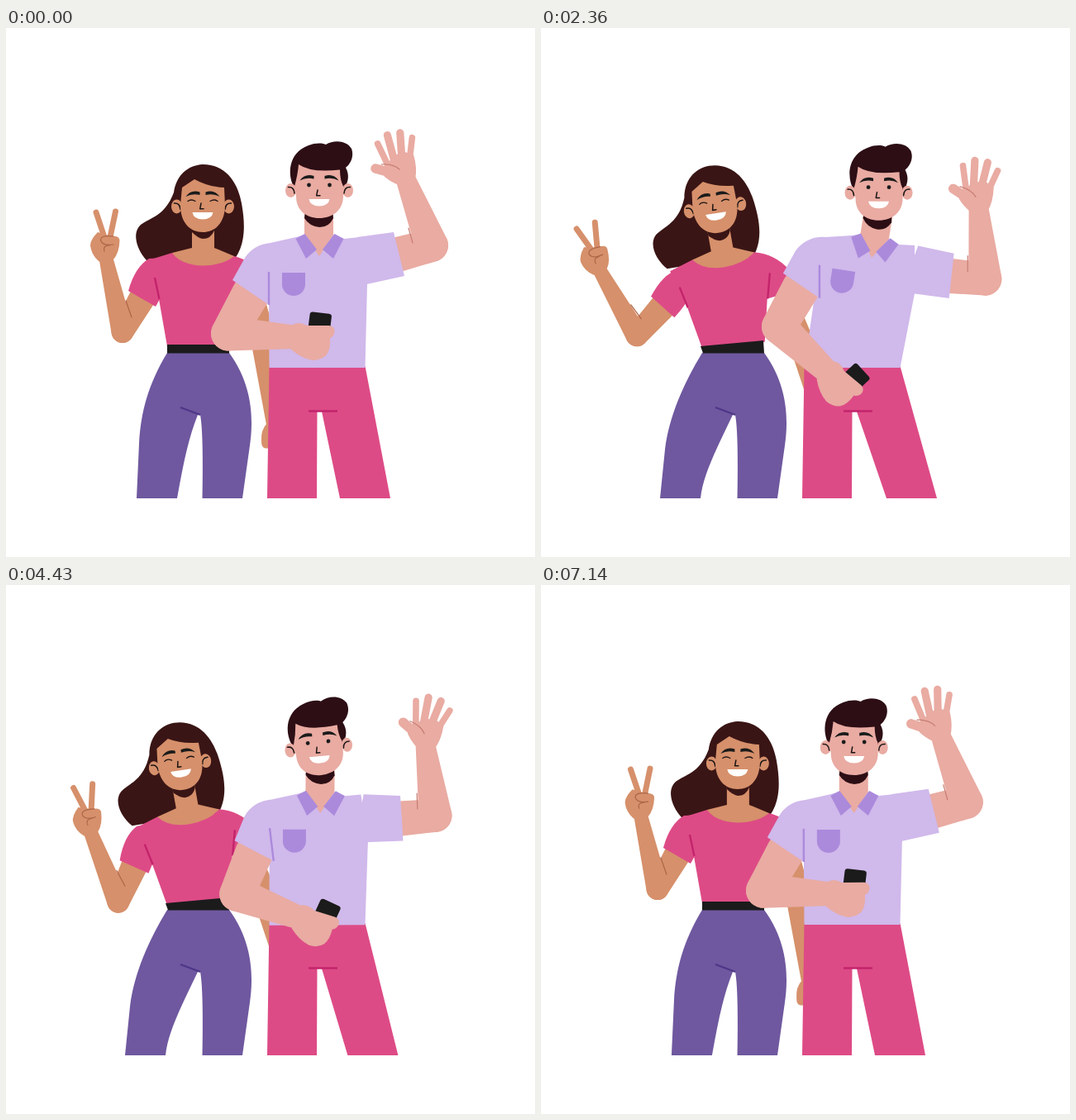
An HTML page for the animation above (7210 ms loop, 640x640 px).

```html
<!DOCTYPE html>
<html lang="en">
<head>
<meta charset="utf-8">
<title>Waving friends</title>
<style>
  html, body { margin: 0; width: 100%; height: 100%; overflow: hidden; background: #fff; }
  svg { display: block; width: 100vw; height: 100vh; }
  .line { fill: none; stroke-linecap: round; stroke-linejoin: round; }
  .ink { stroke: #1a1414; stroke-width: 1.5; }
  .tan { fill: #d6906b; }
  .tanStroke { stroke: #d6906b; }
  .tanCrease { stroke: #ad6647; stroke-width: 1.2; }
  .rose { fill: #e9aba2; }
  .roseStroke { stroke: #e9aba2; }
  .roseCrease { stroke: #c77d72; stroke-width: 1.2; }
  .brown { fill: #3a1515; }
  .dark { fill: #2d0e15; }
  .pink { fill: #dd4b86; }
  .lilac { fill: #d0b9eb; }
  .violet { fill: #ab8adc; }
  .purple { fill: #6f589f; }
  .black { fill: #1b1b1b; }
  .white { fill: #fff; }
  .fold { stroke-width: 2.4; stroke-linecap: butt; }
  .pinkFold { stroke: #c3246c; }
  .violetFold { stroke: #ab8adc; }
  .purpleFold { stroke: #4e3788; }
</style>
</head>
<body>
<svg id="stage" viewBox="0 0 640 640"></svg>
<script>
const LOOP = 7210, STEPS = 101;
const rad = deg => deg * Math.PI / 180;

const shape = (cls, d) => `<path class="${cls}" d="${d}"/>`;
const line = (cls, d, width) =>
  `<path class="line ${cls}" d="${d}"${width ? ` style="stroke-width:${width}"` : ''}/>`;
const oval = (cls, x, y, rx, ry = rx) =>
  `<ellipse class="${cls}" cx="${x}" cy="${y}" rx="${rx}" ry="${ry}"/>`;
const group = (id, ...parts) => `<g id="${id}">${parts.join('')}</g>`;
const shift = (x, y, ...parts) => `<g transform="translate(${x} ${y})">${parts.join('')}</g>`;
const mirrored = (...parts) => parts.join('') + `<g transform="scale(-1 1)">${parts.join('')}</g>`;
const polar = (x, y, r, a) => `${(x + r * Math.cos(a)).toFixed(2)} ${(y + r * Math.sin(a)).toFixed(2)}`;

// Tapered limb with round ends.
function limb(cls, x1, y1, r1, x2, y2, r2) {
  const a = Math.atan2(y2 - y1, x2 - x1);
  const b = Math.acos((r1 - r2) / Math.hypot(x2 - x1, y2 - y1));
  return shape(cls, `M${polar(x1, y1, r1, a + b)}A${r1} ${r1} 0 1 1 ${polar(x1, y1, r1, a - b)}` +
    `L${polar(x2, y2, r2, a - b)}A${r2} ${r2} 0 0 1 ${polar(x2, y2, r2, a + b)}Z`);
}

// Both faces share their features; the origin lies between the ears.
function face(skin, earX, mouthY, skull, eye) {
  return mirrored(
    oval(skin, -earX, 0, 6.5, 8.5),
    line('ink', `M${-earX - 3} -4Q${4 - earX} -4.500 ${4.5 - earX} 3.500`)) +
    shape(skin, skull) +
    mirrored(
      shift(34.5 - earX, 0, shape('black', 'M-23.500 -12Q-17 -21 -6.500 -17.500V-14Q-16 -16 -23.500 -12Z')),
      eye) +
    line('ink', `M-2 ${mouthY - 11}L-3.300 ${mouthY - 4.2}H1`) +
    shape('white', `M-12.500 ${mouthY}H12.500Q11 ${mouthY + 8.5} 0 ${mouthY + 8.5}Q-11 ${mouthY + 8.5} -12.500 ${mouthY}Z`);
}

// Four fingers fan out from the wrist, the second one longest.
function fingers(x, y) {
  return [0, 1, 2, 3].map(i => {
    const base = polar(x, y, 27, rad(-142 + 20.5 * i));
    const tip = polar(x, y, 59 - 2.2 * (i - 1.2) ** 2, rad(-128 + 15.4 * i));
    return line('roseStroke', `M${base}L${tip}`, i % 3 ? 9.2 : 7.6);
  }).join('');
}

const peaceArm = group('peaceArm',
  limb('tan', 165, 326, 16, 141, 367.5, 13.5),
  group('peaceFore',
    limb('tan', 141, 367.5, 13.5, 121.5, 281, 8.5),
    line('tanCrease', 'M145 330L152 350'),
    line('tanStroke', 'M109 223L119 253M132.500 222L126 253', 7),
    shape('tan', 'M111 247L127 252Q137 251 137.500 257Q137 272 130 280Q121 286 112 282Q103 274 102 263Q102 256 111 247Z'),
    line('tanCrease', 'M130 252Q114 250 114.500 257Q117 264 130 262M125 263Q117 263 119 270')),
  shape('pink', 'M181 337L148 318Q156 289 173 279L196 278L192 315L186 328Z'));

const woman = group('woman',
  group('restArm',
    shape('tan', 'M288 320L298 388L315 480H340V400L326 375L314 330Z'),
    shape('tan', 'M316 478Q308 486 309 500Q309 508 314 508.500H330V478Z')),
  group('womanLegs',
    '<path id="womanLeg" class="purple"/>',
    shape('purple', 'M195 393H270C300 434 299 477 295 505L286 569H237.500Q239 490 235 468L205 461Z'),
    line('fold purpleFold', 'M211 459L235 468')),
  group('womanTorso',
    group('womanHair',
      shape('brown', 'M238 165C268 165 281 190 285 212C290 240 289 262 277 279L170 281C158 268 152 248 163 238C175 229 192 228 203 199C206 178 220 166 238 165Z')),
    peaceArm,
    shape('pink', 'M276 276Q300 282 314 304L312 331L282 334L270 385H195L185 328L172 281L201 272Z'),
    line('fold pinkFold', 'M180 302L185.500 328M290.500 304L282.500 334'),
    shape('tan', 'M225 235V266L201 272Q212 287 238 287.500Q263 287 276 276L252 266V235Z'),
    shape('brown', 'M225 240H252V245Q248 255 238 255Q232 254 225 247Z'),
    group('womanHead', shift(238, 216, face('tan', 31.5, 7,
      'M-27 -2L-25 -23L-10 -33Q6 -24 26 -23L27 -2C27 20 15 31 0 31C-15 31 -27 20 -27 -2Z',
      line('ink', 'M-18 -6.500Q-14 -9.500 -9 -6.500', 1.3))))),
  '<path id="belt" class="black"/>');

const waveArm = group('waveArm',
  limb('rose', 474, 274, 21, 515, 263, 20),
  group('waveFore',
    limb('rose', 515, 263, 20, 484, 184, 12),
    line('roseCrease', 'M487 242L492 260'),
    group('waveHand',
      fingers(484, 184),
      line('roseStroke', 'M447 170L465 175', 11.5),
      shape('rose', 'M461 166L467 156L475 152L482 150L493 153Q498 170 495 183Q491 191 484 192Q470 190 458 180L452 168Z'),
      line('roseCrease', 'M454 165Q468 164 476 171'))),
  shape('lilac', 'M482 300L469 247L425 253V312.500Z'));

const phoneArm = group('phoneArm',
  limb('rose', 296, 322, 23, 269, 369.5, 21),
  group('phoneFore',
    limb('rose', 269, 369.5, 21, 352, 374, 14),
    '<rect class="black" x="368" y="343" width="26.500" height="22" rx="3.500" transform="rotate(7 368 343)"/>',
    shape('rose', 'M345 360Q354 354 364 360H391Q398 361 397.500 368Q396 374 392 375Q393 388 388 395Q382 402 371 402Q358 400 345 389Z')),
  shape('lilac', 'M318 335L274 305L289 278Q295 269 305 266L330 275V320Z'),
  line('fold violetFold', 'M318 295V335'));

const man = group('man',
  '<path id="manLegs" class="pink"/>',
  line('fold pinkFold', 'M366 463.500H401'),
  group('manTorso',
    waveArm,
    '<path id="shirt" class="lilac"/>',
    shape('rose', 'M361 205V250L379 276L396 250V205Z'),
    shape('dark', 'M362 222H395L396 230Q391 241 379.500 241Q367 240 361 230Z'),
    shift(379.5, 0, mirrored(shape('violet', 'M-29 255L-18 249L-3.500 268L-16.500 279Z'))),
    shape('violet', 'M334 296H362V310A14 14 0 0 1 334 310Z'),
    phoneArm,
    group('manHead',
      shape('dark', 'M349 194C340 178 341 151 366 142C374 138.500 384 139 387 141C397 135 412 136 418 146C422 157 415 166 411 169C416 178 414 187 409 194Z'),
      shift(379, 196.5, face('rose', 34.5, 10.5,
        'M-30 -5Q-26 -19 -25 -31.500Q-10 -21 25 -25Q25 -13 29 -5V7C29 24 16 33.500 0 33.500C-16 33.500 -28 24 -28 7Z',
        oval('black', -12.5, -6.5, 2.4))))));

document.getElementById('stage').innerHTML = woman + man;

const el = id => document.getElementById(id);
const draw = (id, d) => el(id).setAttribute('d', d);
const turn = (id, deg, x, y, lift = [0, 0]) =>
  el(id).setAttribute('transform', `translate(${lift}) rotate(${deg} ${x} ${y})`);

function poseWoman(ease) {
  const lean = ease(15, 32) - ease(78, 101);
  const arm = -14 * ease(0, 15) + 36 * ease(15, 33) - 18 * ease(46, 62) - 4 * ease(78, 101);
  const swing = -18.5 * ease(0, 15) - 10.5 * ease(15, 33) - 9.5 * ease(33, 46) +
    35.5 * ease(46, 62) - 21 * ease(62, 80) + 24 * ease(80, 101);

  turn('womanTorso', -10 * lean, 240, 378);
  for (const id of ['womanHair', 'womanHead']) turn(id, 1.7 * lean, 238, 245, [0, -1.5 * lean]);
  turn('restArm', -8 * lean, 300, 390, [4 * lean, 0]);
  turn('peaceArm', arm, 174, 302);
  turn('peaceFore', swing, 141, 367.5);

  draw('womanLeg', `M195 393C172 431 ${163 - 8 * lean} ${465 + 5 * lean} ${161 - 11 * lean} ${503 + 7 * lean}` +
    `L${158 - 14 * lean} 569h49C${214 - 18 * lean} ${530 + 10 * lean} ${220 - 7 * lean} ${498 + 10 * lean} 232 468L250 440V393Z`);
  draw('belt', `M${195 - 2 * lean} ${383 + 2 * lean}L${270 - lean} ${383 - 5 * lean}L270 393.500H${195 + lean}Z`);
}

function poseMan(ease, step) {
  const tilt = 9 * ease(0, 16) - 17 * ease(47, 77) + 8 * ease(84, 101);
  // Arms, head and leg trail the torso a little.
  const out = ease(0, 16) - ease(52, 78);
  const back = ease(52, 78) - ease(82, 101);
  const phase = 3 * 2 * Math.PI * step / STEPS;
  const wave = (1 - Math.cos(phase)) / 2;

  turn('manTorso', tilt, 377, 411);
  turn('manHead', -9 * out, 379, 222);
  turn('phoneArm', -9 * out - 4 * back, 315, 295);
  turn('phoneFore', 40 * out - 7 * back, 269, 369.5);
  turn('waveArm', (11 + 15 * wave) * out, 429.5, 290);
  turn('waveFore', 26 * wave - 4 * out, 515, 263);
  turn('waveHand', -15 * Math.sin(phase), 484, 184);

  draw('manLegs', `M318.500 409L316 569H376L376.500 464H382L${404 + 14 * out} 569h61L434.500 409Z`);

  // The hem stays put while the rest of the shirt leans.
  const hem = (dx, dy) => polar(377, 411, Math.hypot(dx, dy), Math.atan2(dy, dx) - rad(tilt));
  draw('shirt', `M351 253L320 260Q300 262 290 277L300 300L318 332L${hem(-58.5, 2 * back)}L${hem(57.5, back)}` +
    'L437 310L428 253L409 255L396 250H361Z');
}

function pose(step) {
  const ease = (from, to) => {
    const u = Math.min(1, Math.max(0, (step - from) / (to - from)));
    return u * u * (3 - 2 * u);
  };
  poseWoman(ease);
  poseMan(ease, step);
}

const start = performance.now();
function tick(now) {
  const time = Math.max(0, now - start) % LOOP;
  pose(Math.min(STEPS - 1, Math.floor((time + 5) * STEPS / LOOP)));
  requestAnimationFrame(tick);
}
pose(0);
requestAnimationFrame(tick);
</script>
</body>
</html>
```
